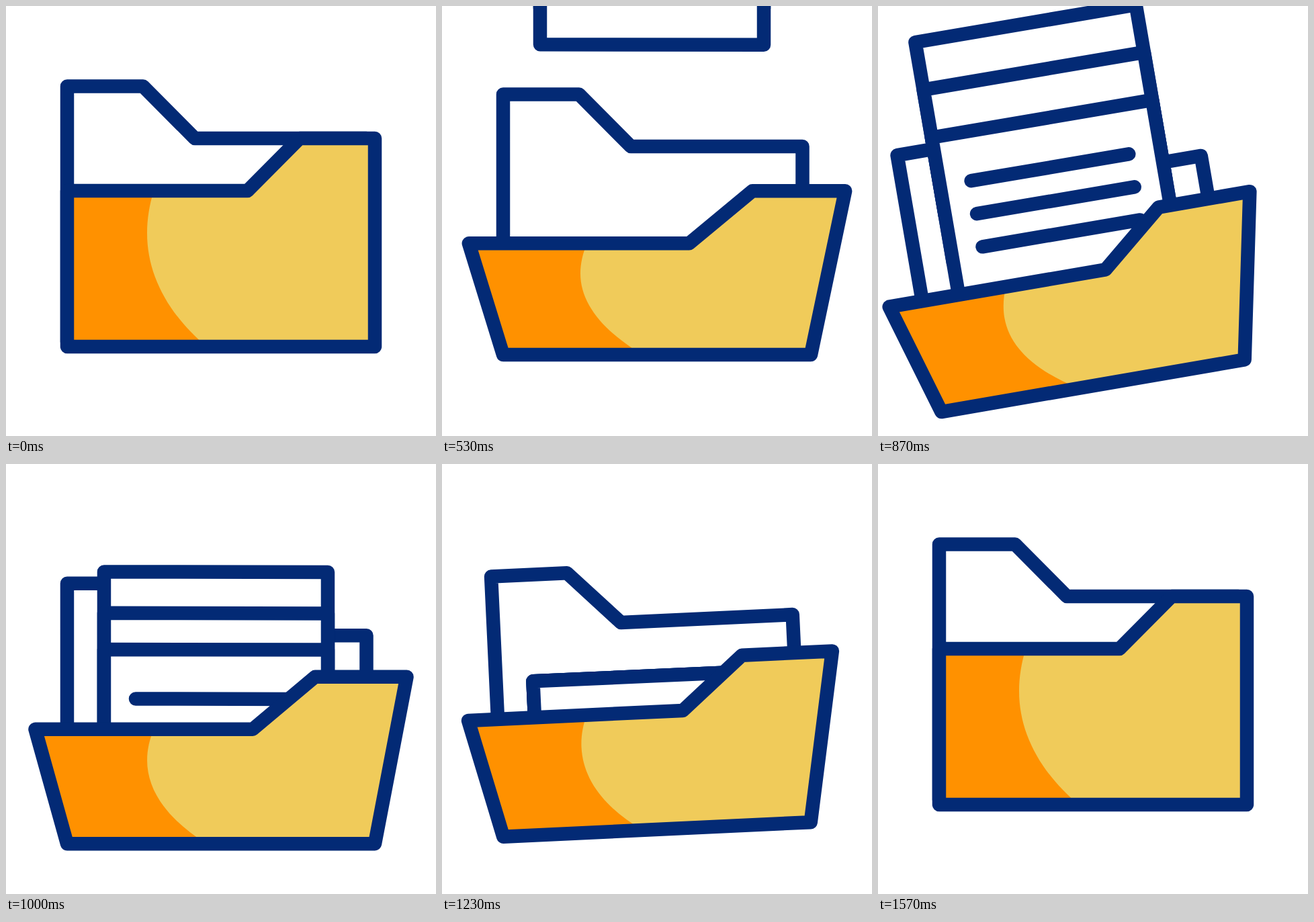
An HTML page that plays this animation: 640 by 640 pixels, repeating every 2 s.

```html
<!DOCTYPE html>
<html lang="en">
<head>
<meta charset="utf-8">
<title>Folder</title>
<style>
  html, body { margin: 0; width: 100%; height: 100%; overflow: hidden; background: #fff; }
  svg { display: block; width: 100vw; height: 100vh; }
  .line { fill: none; stroke: #032a75; stroke-width: 20.5; stroke-linecap: round; stroke-linejoin: round; }
  .paper { fill: #fff; }
</style>
</head>
<body>
<svg viewBox="0 0 640 640">
  <g id="folder">
    <path class="line paper" d="M91 500V119.5H204L281 197H536.5V500Z"/>
    <g id="docs"></g>
    <path id="front" fill="#ff9100"/>
    <path id="glow" fill="#f0cb5a"/>
    <path id="rim" class="line"/>
  </g>
</svg>
<script>
const LOOP = 2000, STEP = 100 / 3;
const PIVOT = [320, 507];
const DOC_HEIGHT = 261.5, DOC_DELAY = 200 / 3, FLOOR = 500;

// Tracks are [time, value] pairs
const OPEN = [[15, 0], [588, 1], [733, 1], [1000, 0.905], [1167, 0.905], [1567, 0]];
const DROP = [[413, 0], [824, 58.2], [1045, 58.2], [1505, 0]];
const TILT = [[533, 0], [900, -10], [1064, 5.1], [1233, -2.69], [1400, 0]];
const SLOSH = [[0, 0], [533, -4], [733, -4], [1233, 3.4], [1567, 0]];
const FALL = [[333, -340], [533, -216.5], [733, -42], [867, 102.5], [1000, 217.7], [1100, 278]];

const el = id => document.getElementById(id);
const folder = el('folder'), front = el('front'), glow = el('glow'), rim = el('rim');

// Value on a track; flowing tracks keep their speed through inner points
function at(track, t, flow) {
  const last = track.length - 1;
  if (t <= track[0][0]) return track[0][1];
  if (t >= track[last][0]) return track[last][1];
  let i = 0;
  while (t > track[i + 1][0]) i++;
  const [t0, a] = track[i], [t1, b] = track[i + 1];
  const span = t1 - t0, x = (t - t0) / span;
  const s = x * x * (3 - 2 * x);
  const slope = k => !flow || k === 0 || k === last ? 0 :
    (track[k + 1][1] - track[k - 1][1]) / (track[k + 1][0] - track[k - 1][0]);
  return a + (b - a) * s
    + span * x * (1 - x) * ((1 - x) * slope(i) - x * slope(i + 1));
}

function addPath(parent, cls) {
  const p = document.createElementNS('http://www.w3.org/2000/svg', 'path');
  p.setAttribute('class', cls);
  parent.appendChild(p);
  return p;
}

// Back to front; only the nearest sheet shows its writing
const sheets = [2, 1, 0].map(i => ({
  delay: i * DOC_DELAY,
  page: addPath(el('docs'), 'line paper'),
  text: i === 0 ? addPath(el('docs'), 'line') : null
}));

function drawSheet(sheet, t) {
  const top = at(FALL, t - sheet.delay, true);
  const bottom = Math.min(top + DOC_HEIGHT, FLOOR);
  sheet.page.setAttribute('d', `M146 ${top}L479 ${top + 0.7}V${bottom + 0.4}L146 ${bottom}Z`);
  if (sheet.text) {
    const rows = [73.5, 123.2, 173].map(y => top + y).filter(y => y < bottom - 20);
    sheet.text.setAttribute('d', rows.map(y => `M193 ${y}L431 ${y + 0.5}`).join(''));
  }
}

function drawFront(t) {
  const p = at(OPEN, t), dx = at(SLOSH, t);
  const wide = 52.5 * p, down = 68 * p;
  const left = 275 + down, right = 197 + down;
  const notch = `L${359.5 + 8.5 * p} ${left}L${437 + 25.5 * p} ${right}H${549 + wide}L549 507`;
  const outline = `M91 507L${91 - wide} ${left}${notch}Z`;
  front.setAttribute('d', outline);
  rim.setAttribute('d', outline);

  const squash = (232 - down) / 232;
  const pt = (x, y, k = 1) => `${x + dx * k} ${507 - (507 - y) * squash}`;
  glow.setAttribute('d',
    `M${pt(298.5, 507, 0)}` +
    `C${pt(241, 458, 0.3)} ${pt(210, 400)} ${pt(210, 338)}` +
    `C${pt(210, 317)} ${pt(213.5, 295)} ${pt(220, 275)}${notch}Z`);
}

function draw(t) {
  const [x, y] = PIVOT;
  folder.setAttribute('transform', `translate(0 ${at(DROP, t)}) rotate(${at(TILT, t)} ${x} ${y})`);
  sheets.forEach(s => drawSheet(s, t));
  drawFront(t);
}

let start = null;
function tick(now) {
  if (start === null) start = now;
  const t = (now - start) % LOOP;
  draw(Math.floor((t + 3.4) / STEP) * STEP % LOOP);
  requestAnimationFrame(tick);
}
draw(0);
requestAnimationFrame(tick);
</script>
</body>
</html>
```
